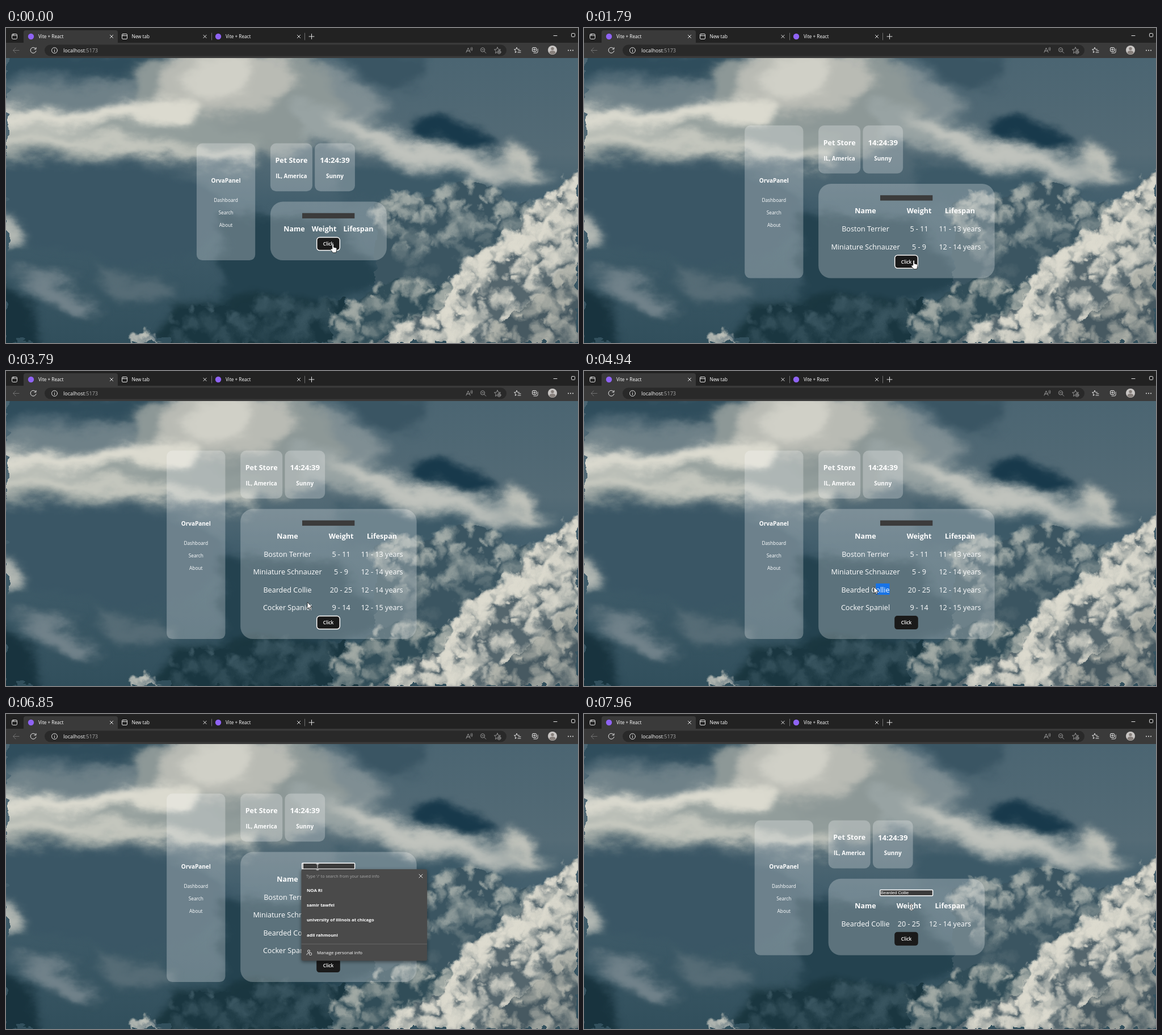
Recreate the animation shown at these times as an HTML page. Size 1008 by 556 pixels, loop 8000 ms.

```html
<!DOCTYPE html>
<html lang="en">
<head>
<meta charset="utf-8">
<title>Pet dashboard</title>
<style>
  html, body { margin: 0; width: 100%; height: 100%; overflow: hidden; background: #4a6675; }
  svg { position: absolute; inset: 0; width: 100vw; height: 100vh; }
  #sky { will-change: transform; }
  text { font-family: "Open Sans", "Noto Sans", sans-serif; fill: #fff; white-space: pre; }
  .b { font-weight: 700; }
  .s { font-weight: 600; }
  .m { text-anchor: middle; }
  .dim { fill: #a9a9a9; }
  .glass { fill: #fff; fill-opacity: .26; }
  .line { fill: none; stroke: #e4e4e4; stroke-width: 1; stroke-linecap: round; stroke-linejoin: round; }
  .pale { stroke: #a4a4a4; stroke-width: .9; }
  .faint { stroke: #707070; }
  .soft { filter: drop-shadow(0 2px 3px rgba(0, 0, 0, .45)); }
</style>
</head>
<body>
<svg id="sky" viewBox="0 0 1008 556" preserveAspectRatio="none">
  <defs>
    <linearGradient id="air" x2="0" y2="1">
      <stop offset=".1" stop-color="#4b6572"/><stop offset=".4" stop-color="#546b76"/>
      <stop offset=".55" stop-color="#435f6d"/><stop offset="1" stop-color="#314f5c"/>
    </linearGradient>
    <filter id="wispy" x="0" y="0" width="1008" height="556" filterUnits="userSpaceOnUse" color-interpolation-filters="sRGB">
      <feGaussianBlur stdDeviation="8" result="b"/>
      <feTurbulence type="fractalNoise" baseFrequency=".012 .02" numOctaves="5" seed="4"/>
      <feDisplacementMap in="b" scale="46" xChannelSelector="R" yChannelSelector="G"/>
    </filter>
    <filter id="billow" x="0" y="0" width="1008" height="556" filterUnits="userSpaceOnUse" color-interpolation-filters="sRGB">
      <feTurbulence type="fractalNoise" baseFrequency=".045" numOctaves="4" seed="9" result="n"/>
      <feDisplacementMap in="SourceGraphic" in2="n" scale="24" xChannelSelector="R" yChannelSelector="G"/>
      <feGaussianBlur stdDeviation=".5"/>
    </filter>
  </defs>
  <rect width="1008" height="556" fill="url(#air)"/>
  <g id="wisps" filter="url(#wispy)"></g>
  <g id="puffs" filter="url(#billow)"></g>
</svg>
<svg id="stage" viewBox="0 0 1008 556" preserveAspectRatio="none">
  <g id="bars"></g>
  <g id="app"></g>
  <g id="menu" class="soft">
    <rect x="463" y="344" width="32" height="26" rx="3" fill="#4b4b4b"/>
    <g fill="#fff"><circle cx="479" cy="353" r="1"/><circle cx="479" cy="357" r="1"/><circle cx="479" cy="361" r="1"/></g>
  </g>
  <g id="popup"></g>
  <rect id="caret" width="1" height="9" fill="#fff"/>
  <g id="cursor">
    <path id="hand" d="M-1.2 9V1.2a1.3 1.3 0 0 1 2.6 0V6l4 .9c1.1.3 1.7 1 1.5 2.2L6.2 13l-.7 2.6H.2L-3.6 11c-1-1.5.2-2.9 1.4-2z" fill="#fff" stroke="#111" stroke-width=".8"/>
    <path id="arrow" d="M0 0v11.6l2.7-2.4 1.8 4.1 1.9-.8-1.8-4H8.2z" fill="#fff" stroke="#111" stroke-width=".8"/>
    <g id="beam" fill="none" stroke-linecap="square">
      <path d="M-2-5H2M0-5V5M-2 5H2" stroke="#333" stroke-width="2"/>
      <path d="M-2-5H2M0-5V5M-2 5H2" stroke="#eee" stroke-width="1"/>
    </g>
  </g>
</svg>
<script>
const LOOP = 8000;
const $ = id => document.getElementById(id);
const text = (x, y, size, cls, str) => `<text x="${x}" y="${y + size * .36}" font-size="${size}" class="${cls}">${str}</text>`;
const rect = (x, y, w, h, r, attrs) => `<rect x="${x}" y="${y}" width="${w}" height="${h}" rx="${r}" ${attrs}/>`;
const line = (d, cls = '') => `<path class="line ${cls}" d="${d}"/>`;
const cross = (x, y, r = 2.6) => line(`M${x - r} ${y - r}l${2 * r} ${2 * r}m0 ${-2 * r}l${-2 * r} ${2 * r}`);

// ---- Sky ----
const wisps = [
  ['#2f4d5c', 'M-20 40H310L265 85 210 95 150 80 70 76-20 92z'],
  ['#6f8188', 'M-20 120Q100 85 200 95L310 130 200 145-20 150z'],
  ['#3a5563', 'M575 40H740L735 85 690 115 640 95z'],
  ['#7f8e93', 'M520 50Q610 75 670 150L600 175 500 155z'],
  ['#3a5665', 'M-20 240L120 235 335 258 420 330 345 395 200 425-20 350z'],
  ['#8d9897', 'M215 75L300 40H540L575 110 620 180 500 220 330 215 250 180z'],
  ['#b9bbb4', 'M300 40H500L520 90 470 130 400 150 320 145 270 125z'],
  ['#d0d0c7', 'M335 60L420 45 435 100 380 120 310 118z'],
  ['#929d9b', 'M-20 150L345 145 450 200 430 240 200 228-20 235z'],
  ['#c6c8bf', 'M-20 186Q150 176 260 200T440 218L425 242 300 228 120 212-20 214z'],
  ['#dbdacf', 'M-20 144Q110 150 200 130T345 142L325 176 200 166 100 176-20 178z'],
  ['#3c5967', 'M580 235Q720 250 900 285L700 310 590 300z'],
  ['#98a3a3', 'M500 130Q620 150 700 182T860 225L970 258 850 275 740 255 640 220 520 195z'],
  ['#c0c3bd', 'M560 155Q680 175 780 220T940 250L850 262 730 240 650 208z'],
  ['#18394b', 'M712 165Q760 145 808 163T875 222L790 210 722 190z'],
  ['#c1c3bb', 'M875 240L903 205 932 240 955 268z'],
  ['#24424f', 'M380 330H580L660 440 520 510 380 480z'],
  ['#b3b8b3', 'M-20 325L22 342 38 358 10 378-20 374z'],
  ['#71828a', 'M5 425Q90 430 165 490L150 512 60 472z'],
  ['#566c76', 'M150 430L260 445 310 478 200 484z'],
  ['#18333e', 'M-20 450L40 470 65 570H-20z'],
  ['#1a363f', 'M260 570L300 495 450 472 640 500 640 570z']
];
$('wisps').innerHTML = wisps.map(([c, d]) => `<path d="${d}" fill="${c}"/>`).join('');

let seed = 17, heaps = 0;
const random = () => (seed = seed * 16807 % 2147483647) / 2147483647;

// Soft lit puffs over a shadowed body; the light fades away from the ridge.
function cloud(ridge, count, depth, size, light, shade, fade = .75) {
  const id = 'heap' + heaps++;
  const puffs = Array.from({ length: count }, () => {
    const p = random() * (ridge.length - 1), i = Math.floor(p), f = p - i;
    const [x0, y0] = ridge[i], [x1, y1] = ridge[i + 1], drop = random() ** 1.4;
    return {
      x: x0 + (x1 - x0) * f + drop * depth * .3, y: y0 + (y1 - y0) * f + drop * depth,
      r: size * (.4 + random()), drop, lit: (1 - fade * drop) * (.65 + .35 * random())
    };
  }).sort((a, b) => a.drop - b.drop);
  const [x0, y0] = ridge[0], [x1, y1] = ridge[ridge.length - 1];
  const ball = (p, dx, dy, fill, alpha) => `<circle cx="${(p.x + dx * p.r).toFixed(1)}" cy="${(p.y + dy * p.r).toFixed(1)}"
    r="${p.r.toFixed(1)}" fill="${fill}" opacity="${alpha.toFixed(2)}"/>`;
  const glow = (name, color) => `<radialGradient id="${id + name}"><stop offset=".3" stop-color="${color}"/>
    <stop offset="1" stop-color="${color}" stop-opacity="0"/></radialGradient>`;
  return glow('a', light) + glow('b', shade) +
    `<path fill="${shade}" d="M${ridge.join('L')}L${x1} ${y1 + depth}L${x0} ${y0 + depth}z"/>` +
    puffs.map(p => ball(p, .45, .8, `url(#${id}b)`, .8) + ball(p, 0, .2, `url(#${id}a)`, p.lit)).join('');
}
$('puffs').innerHTML =
  cloud([[650, 305], [690, 290], [735, 302], [770, 284], [805, 272], [850, 277], [875, 302], [930, 312]],
    150, 150, 14, '#a3aca8', '#3b5561', 1) +
  cloud([[290, 508], [335, 488], [400, 494], [445, 475], [520, 488], [600, 478]], 60, 80, 18, '#3a5661', '#1a3640') +
  cloud([[570, 512], [620, 478], [690, 438], [740, 450], [800, 450]], 110, 110, 13, '#a2aaa5', '#314d58', .95) +
  cloud([[210, 560], [240, 534], [270, 560]], 16, 18, 10, '#bfc2ba', '#647780') +
  cloud([[640, 560], [700, 522], [765, 492], [788, 460], [795, 435], [832, 395], [875, 375], [905, 348], [938, 308], [972, 280], [1015, 245]],
    520, 190, 13, '#dddbcf', '#55666d', .6) +
  cloud([[850, 545], [890, 505], [930, 480], [970, 440], [1015, 410]], 110, 140, 13, '#b3b5ac', '#475961', .7);

// ---- Browser frame ----
const badge = x => `<circle cx="${x}" cy="15" r="5.2" fill="#8f63f5"/>`;
const page = rect(204.5, 10.5, 9, 9, 1.5, 'class="line"') + line('M205 13.5h8M207 12h.1');
const tab = (x, title, icon) => icon + text(x + 26, 15, 8.2, '', title) + cross(x + 155, 15);
$('bars').innerHTML =
  rect(0, 0, 1008, 27, 0, 'fill="#222"') + rect(0, 26, 1008, 27, 0, 'fill="#3a3a3a"') +
  '<path d="M31 27V8q0-4 4-4H193q4 0 4 4V27z" fill="#3a3a3a"/>' +
  rect(68, 29.5, 814, 20, 10, 'fill="#292929"') +
  rect(10.5, 10.5, 9, 9, 2, 'class="line"') + line('M11 13h8M13 11v2') +
  tab(31, 'Vite + React', badge(44)) + tab(195.5, 'New tab', page) + tab(361, 'Vite + React', badge(374)) +
  line('M362.5 9V21M526.5 9V21', 'faint') + line('M534 15h9M538.5 10.5v9') +
  line('M965 13.5h6') + rect(996.5, 9.5, 6, 6, 1, 'class="line"') +
  line('M23 39.5H12.5l4.5-4.5m-4.5 4.5l4.5 4.5', 'faint') +
  line('M52.3 36.5A5 5 0 1 0 53 40.5M53 34.5v2.8h-3') +
  '<circle cx="85.5" cy="39.5" r="5" class="line"/>' + line('M85.5 39v3M85.5 37v.1') +
  text(101, 39.5, 9.05, '', 'localhost<tspan fill="#a9a9a9">:5173</tspan>') +
  line('M811 43l3.5-8 3.500 8m-6-2.500h5M819 35q1.500 1.500 0 4M821 34q2 2.500 0 6', 'pale') +
  '<circle cx="840" cy="38.5" r="3.6" class="line pale"/>' + line('M842.7 41.2l3 3M838.5 38.5h3', 'pale') +
  line('M866 34l1.6 3.6 3.9.4-2.9 2.6M866 34l-1.6 3.6-3.9.4 2.9 2.6-.8 3.9 2.4-1.4', 'pale') +
  '<circle cx="869" cy="42.5" r="3" class="line pale"/>' + line('M867.5 42.5h3M869 41v3', 'pale') +
  line('M900 34.5l1.3 3 3.2.3M900 34.5l-1.3 3-3.2.3 2.5 2.3-.7 3.4 2.3-1.5M903 40h4M902 43h5') +
  rect(927.5, 34.5, 7, 7, 1.5, 'class="line"') + line('M930 44h5q2 0 2-2v-5M931 36v4M929 38h4') +
  '<circle cx="963" cy="39" r="8" fill="#c9c6c4"/><circle cx="963" cy="36.5" r="2.7" fill="#87807c"/>' +
  '<path d="M957.5 44q0-4 5.5-4t5.5 4q-5.5 5-11 0z" fill="#87807c"/>' +
  [991, 995, 999].map(x => `<circle cx="${x}" cy="39.5" r="1" fill="#e4e4e4"/>`).join('');

const saved = ['NOA RI', 'samir tawfel', 'university of illinois at chicago', 'adil rahmouni'];
$('popup').innerHTML = rect(520.5, 274, 221.5, 161.5, 3, 'fill="#4a4a4a" class="soft"') +
  text(529, 286, 7.25, 'dim', "Type '/' to search from your saved info") + cross(731, 286, 3) +
  saved.map((name, i) => text(530, 311 + i * 26.3, 7.8, 'b', name)).join('') +
  rect(520.5, 405.5, 221.5, 1, 0, 'fill="#686868"') +
  '<circle cx="533.5" cy="418.5" r="2" class="line"/>' + line('M530 425q0-3 4-3') + rect(534.5, 421.5, 4, 4, 1, 'class="line"') +
  text(548, 421, 7.9, '', 'Manage personal info');

// ---- Page ----
const dogs = [
  ['Boston Terrier', '5 - 11', '11 - 13 years'],
  ['Miniature Schnauzer', '5 - 9', '12 - 14 years'],
  ['Bearded Collie', '20 - 25', '12 - 14 years'],
  ['Cocker Spaniel', '9 - 14', '12 - 15 years']
];
const narrow = { width: 272, cols: [496.5, 571, 643] };
const wide = { width: 310.5, cols: [496, 590.5, 662.5] };
const states = [
  { at: 0, rows: [], width: 205, cols: [508, 560.5, 621] },
  { at: 380, rows: [0], ...narrow },
  { at: 1500, rows: [0, 1], ...wide },
  { at: 2010, rows: [0, 1, 2], ...wide },
  { at: 3120, rows: [0, 1, 2, 3], ...wide },
  { at: 7400, rows: [2], width: 275.5, cols: [496, 572.5, 645] }
];
const BLUR = 4630, FOCUS = 6710, LIST = 6850, PASTE = 7400;

function drawApp({ rows, width, cols }, buttonFocus, inputFocus, typed) {
  const half = 103.25 + rows.length * 15.75;
  const top = 306.85 - half, bottom = 306.85 + half;
  const left = 568.4 - width / 2, side = left - 130, panel = top + 103;
  const field = panel + 24.8, button = bottom - 29;
  const links = ['Dashboard', 'Search', 'About'];
  const cells = (list, y, size, cls) => list.map((s, c) => text(cols[c], y, size, 'm ' + cls, s)).join('');
  $('app').innerHTML =
    rect(side, top, 103.3, half * 2, 10, 'class="glass"') +
    rect(left, top, 74, 84.7, 10, 'class="glass"') +
    rect(left + 78.3, top, 70.7, 84.7, 10, 'class="glass"') +
    rect(left, panel, width, bottom - panel, 22, 'class="glass"') +
    text(side + 51.6, 269.5, 10, 'b m', 'OrvaPanel') +
    links.map((s, i) => text(side + 51.6, 303.7 + i * 22.2, 8.3, 'm', s)).join('') +
    text(left + 37, top + 30, 12.5, 'b m', 'Pet Store') + text(left + 37, top + 58, 9.9, 'b m', 'IL, America') +
    text(left + 113.6, top + 30, 13.2, 'b m', '14:24:39') + text(left + 113.6, top + 58, 10, 'b m', 'Sunny') +
    rect(522, field - 4.7, 92.3, 9.4, 0, 'fill="#3b3b3b"') +
    (inputFocus ? rect(521.7, field - 5.2, 92.9, 10.4, 1, 'fill="none" stroke="#fff" stroke-width="1.5"') : '') +
    (typed ? `<text x="523" y="${field + 2.7}" font-size="7.5" style="font-family:'Liberation Sans',Arial,sans-serif">${typed}</text>` : '') +
    cells(['Name', 'Weight', 'Lifespan'], panel + 47.7, 12.5, 'b') +
    '<rect id="mark" y="375" height="20" width="0" fill="#1873e6"/>' +
    rows.map((r, i) => `<g id="row${r}">${cells(dogs[r], panel + 79.5 + i * 31.5, 12.6, '')}</g>`).join('') +
    rect(547.2, button - 12, 41.6, 24, 5, 'fill="#1a1a1a"') +
    (buttonFocus ? rect(547.7, button - 11.5, 40.6, 23, 5, 'fill="none" stroke="#fff" stroke-width="1.5"') : '') +
    text(568, button, 8.3, 's m', 'Click');
}

// ---- Pointer: time, x, y ----
const path = [
  [0, 576, 381], [380, 576, 381], [810, 577, 392], [1170, 577, 392], [1370, 579, 398], [1500, 579, 398],
  [1790, 581, 410], [2420, 581, 410], [2760, 570, 424], [2899, 570, 424], [2900, 570, 425], [3120, 570, 425],
  [3320, 558, 421], [3490, 558, 421], [3800, 531, 408], [3970, 544, 411], [4130, 544, 411], [4480, 539, 393],
  [4630, 539, 393], [4740, 536, 385], [4940, 511, 381], [5360, 453, 380], [5960, 453, 380], [6510, 549, 270],
  [PASTE, 549, 270], [7960, 577, 341], [LOOP, 577, 341]
];
function pointer(t) {
  const i = path.findIndex(p => p[0] > t);
  const [t0, x0, y0] = path[i - 1], [t1, x1, y1] = path[i];
  const u = (t - t0) / (t1 - t0), e = u * u * (3 - 2 * u);
  return [x0 + (x1 - x0) * e, y0 + (y1 - y0) * e];
}

const show = (id, on) => $(id).setAttribute('visibility', on ? 'visible' : 'hidden');

// Selects whole letters of the third name from its end back to x.
function select(x) {
  const cell = $('row2').firstElementChild, box = cell.getBBox(), end = box.x + box.width;
  let from = end;
  for (let i = cell.getNumberOfChars() - 1; i >= 0; i--) {
    const start = cell.getStartPositionOfChar(i).x;
    if ((start + cell.getEndPositionOfChar(i).x) / 2 < x) break;
    from = start;
  }
  $('mark').setAttribute('x', from);
  $('mark').setAttribute('width', end - from);
}

let drawn = '';
function frame() {
  const t = performance.now() % LOOP;
  const state = states.filter(s => s.at <= t).pop();
  const buttonFocus = t < BLUR, inputFocus = t >= FOCUS, pasted = t >= PASTE;
  const key = [state.at, buttonFocus, inputFocus].join();
  if (key !== drawn) {
    drawn = key;
    drawApp(state, buttonFocus, inputFocus, pasted && 'Bearded Collie');
  }
  const [x, y] = pointer(t);
  if (t >= BLUR && t < FOCUS) select(t < 5360 ? x : 453);
  show('menu', t >= 5790 && t < FOCUS);
  show('popup', t >= LIST && t < PASTE);
  show('caret', (t >= FOCUS && t < 7230) || (pasted && t < 7930));
  $('caret').setAttribute('x', pasted ? 572.5 : 523);
  $('caret').setAttribute('y', pasted ? 311 : 264);
  $('cursor').setAttribute('transform', `translate(${x.toFixed(2)} ${y.toFixed(2)})`);
  show('hand', t < 3120);
  show('arrow', t >= 3120 && t < 6450);
  show('beam', t >= 6450);
  requestAnimationFrame(frame);
}
frame();
</script>
</body>
</html>
```
